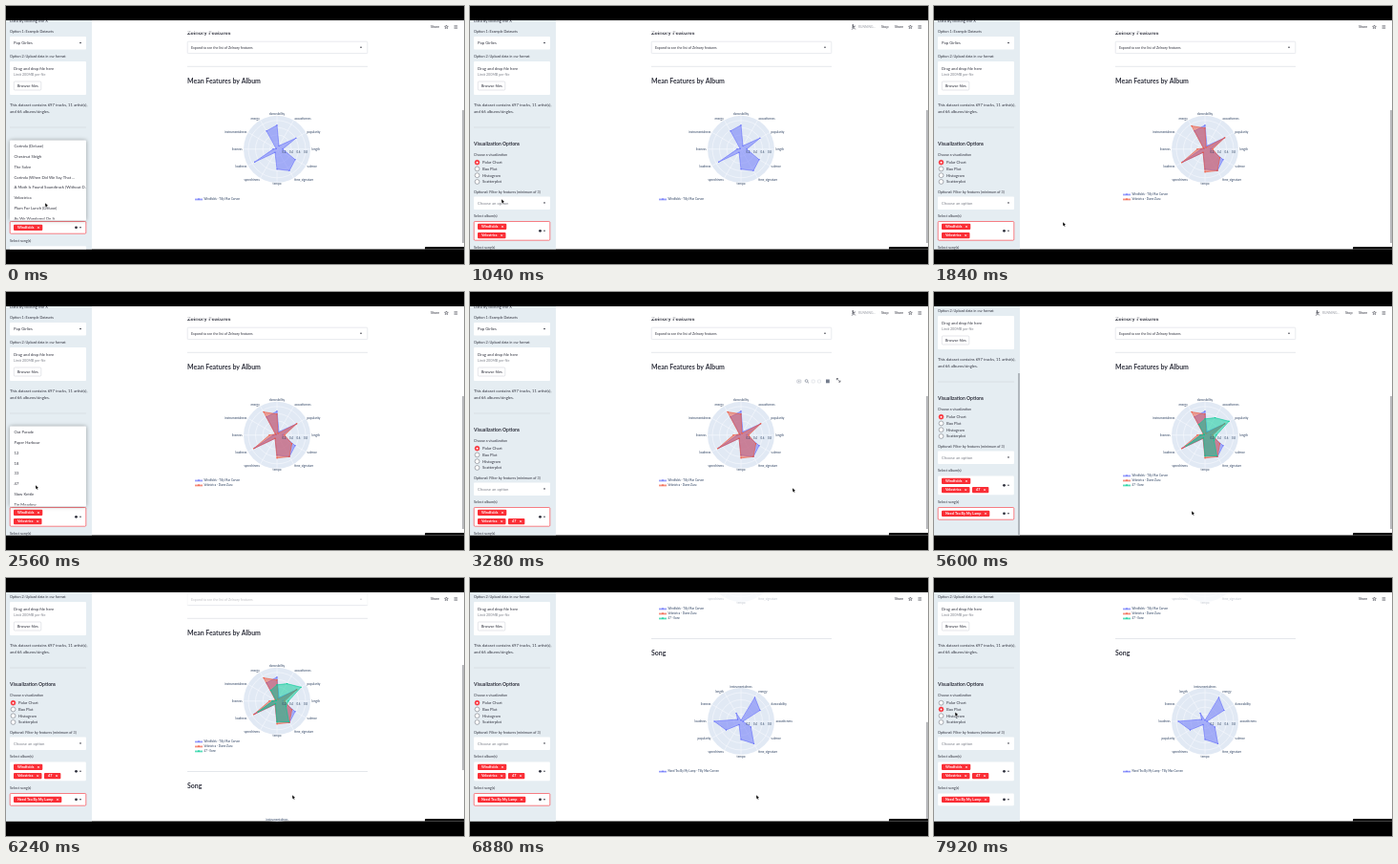
An HTML page with a canvas that plays this animation: 480 by 270 pixels, repeating every 8000 ms.

```html
<!DOCTYPE html>
<html lang="en">
<head>
<meta charset="utf-8">
<title>Music dashboard</title>
<style>
html, body { margin: 0; width: 100%; height: 100%; overflow: hidden; background: #000; }
canvas { display: block; width: 480px; height: 270px; }
</style>
</head>
<body>
<canvas id="stage"></canvas>
<script>
const LOOP = 8000;
const INK = '#31333f', RED = '#fa2d35', SIDE = '#e5edf2', GREY = '#7f838c';
const BLUE = '99,110,250', CORAL = '239,85,59', GREEN = '0,204,150';

const canvas = document.getElementById('stage');
const c = canvas.getContext('2d');
const dpr = window.devicePixelRatio || 1;
canvas.width = 480 * dpr;
canvas.height = 270 * dpr;

const albumAxes = ['length', 'popularity', 'acousticness', 'danceability', 'energy', 'instrumentalness',
  'liveness', 'loudness', 'speechiness', 'tempo', 'time_signature', 'valence'];
const songAxes = ['acousticness', 'danceability', 'energy', 'instrumentalness', 'length', 'liveness',
  'loudness', 'popularity', 'speechiness', 'tempo', 'time_signature', 'valence'];
const albums = [
  { tag: 'Windfolds', name: 'Windfolds - Tilly Mae Corven', rgb: BLUE, r: [6, 23, 4, 25, 22, 1, 4, 27, 4, 21, 26, 22] },
  { tag: 'Velostrica', name: 'Velostrica - Dame Zuzu', rgb: CORAL, r: [8, 24, 2, 22, 28, 2, 8, 28, 4, 24, 26, 18] },
  { tag: '47', name: '47 - Ilone', rgb: GREEN, r: [12, 29, 21, 17, 13, 1, 5, 23, 3, 22, 25, 11] }
];
const song = { tag: 'Need Tea By My Lamp', name: 'Need Tea By My Lamp - Tilly Mae Corven', rgb: BLUE,
  r: [2, 23, 29, 1, 10, 4, 28, 18, 4, 19, 27, 12] };
const albumList = ['Corinda (Deluxe)', 'Chestnut Sleigh', 'The Salve', "Corinda (When Did We Say That ...",
  'A Moth Is Found Soundtrack (Without D...', 'Velostrica', 'Plum For Lunch (Deluxe)', 'As We Wandered On It',
  'Oat Parade', 'Paper Harbour', '12', '18', '33', '47', 'Slow Kettle', 'Tin Meadow'];
const songList = ['Bright Crumbs', 'Quiet Ladder', 'Need Tea By My Lamp', 'Half A Pebble', 'Now We Fold It',
  'Soft Gravel', 'The Long Saucer', 'Feathers In Tow'];

// Pointer: time, x, y
const pointer = [[0, 42, 208], [500, 38, 204], [940, 32, 203], [1050, 34, 204], [1700, 136, 228], [1860, 136, 228],
  [2120, 60, 236], [2400, 40, 205], [2720, 24, 203], [2840, 26, 204], [3240, 339, 207], [3560, 338, 207],
  [3900, 60, 205], [4360, 34, 231], [4700, 30, 233], [5080, 36, 170], [5180, 38, 172], [5560, 271, 231],
  [5900, 271, 231], [6200, 301, 229], [7060, 301, 229], [7600, 24, 144], [8000, 23, 142]];

const ramp = (t, a, b) => {
  const p = Math.min(1, Math.max(0, (t - a) / (b - a)));
  return p * p * (3 - 2 * p);
};

function pointerAt(t) {
  const i = Math.max(1, pointer.findIndex(k => k[0] > t));
  const [t0, x0, y0] = pointer[i - 1], [t1, x1, y1] = pointer[i];
  const p = ramp(t, t0, t1);
  return [x0 + (x1 - x0) * p, y0 + (y1 - y0) * p];
}

function text(s, x, y, size = 4.2, color = INK, weight = 400, align = 'left') {
  c.font = `${weight} ${size}px Lato, "Open Sans", sans-serif`;
  c.fillStyle = color;
  c.textAlign = align;
  c.textBaseline = 'middle';
  c.fillText(s, x, y + 0.2);
}

function box(x, y, w, h, fill, stroke, r = 1) {
  c.beginPath();
  c.roundRect(x, y, w, h, r);
  if (fill) { c.fillStyle = fill; c.fill(); }
  if (stroke) { c.strokeStyle = stroke; c.lineWidth = 0.6; c.stroke(); }
}

function path(points, color, width = 0.5) {
  c.beginPath();
  points.forEach(p => c.lineTo(...p));
  c.strokeStyle = color;
  c.lineWidth = width;
  c.stroke();
}

function circle(x, y, r, fill, stroke) {
  c.beginPath();
  c.arc(x, y, r, 0, 7);
  if (fill) { c.fillStyle = fill; c.fill(); }
  if (stroke) { c.strokeStyle = stroke; c.lineWidth = 0.6; c.stroke(); }
}

function clipped(x, y, w, h, draw) {
  c.save();
  c.beginPath();
  c.rect(x, y, w, h);
  c.clip();
  draw();
  c.restore();
}

const rule = (x0, x1, y) => path([[x0, y], [x1, y]], '#c9ced6', 0.5);

function chevron(x, y) {
  c.beginPath();
  c.moveTo(x - 1.2, y - 0.6);
  c.lineTo(x + 1.2, y - 0.6);
  c.lineTo(x, y + 0.9);
  c.fillStyle = INK;
  c.fill();
}

function select(y, label) {
  box(4, y, 80, 13.5, '#fff');
  text(label, 8, y + 6.7, 4.2, label === 'Choose an option' ? GREY : INK);
  chevron(78, y + 6.7);
}

function tag(label, x, y) {
  c.font = '700 3.75px Lato, "Open Sans", sans-serif';
  const w = c.measureText(label).width + 13;
  box(x, y - 3.1, w, 6.3, RED);
  text(label, x + 4, y, 3.75, '#fff', 700);
  const m = x + w - 4.3;
  path([[m - 1, y - 1], [m + 1, y + 1]], '#fff', 0.6);
  path([[m - 1, y + 1], [m + 1, y - 1]], '#fff', 0.6);
  return x + w + 2.5;
}

function multi(y, h, tags, focus) {
  box(4.2, y, 79.6, h, '#fff', focus ? RED : null);
  if (h < 15) tags.forEach(s => tag(s, 8, y + h / 2));
  else {
    tag(tags[0], 8, y + 5.4);
    let x = 8;
    tags.slice(1).forEach(s => { x = tag(s, x, y + 14.6); });
  }
  circle(73.5, y + h / 2, 1.4, INK);
  chevron(78, y + h / 2);
}

function dropdown(items, offset) {
  c.save();
  c.shadowColor = 'rgba(0,0,0,.35)';
  c.shadowBlur = 4 * dpr;
  box(4, 140.5, 80, 84, '#fff');
  c.restore();
  clipped(4, 141, 80, 82.5, () =>
    items.forEach((s, i) => text(s, 8.5, 147 + i * 10.75 - offset)));
}

function sidebar(t, count, hasSong) {
  const extra = count > 1 ? 7 : 0;
  c.fillStyle = SIDE;
  c.fillRect(0, 15, 90, 240);
  c.save();
  c.translate(0, -33 * ramp(t, 3950, 4350));
  text('Data by clicking the X', 4, 16);
  text('Option 1: Example Datasets', 4, 27, 3.75);
  select(32, 'Pop Girlies');
  text('Option 2: Upload data in csv format', 4, 53, 3.75);
  box(4, 58, 80, 35, '#fff');
  text('Drag and drop file here', 8, 65.8);
  text('Limit 200MB per file', 8, 72, 3.7, GREY);
  box(8.3, 79, 28.5, 9, '#fff', '#d3d6dc');
  text('Browse files', 11.7, 83.5);
  text('This dataset contains 697 tracks, 11 artist(s),', 4, 104);
  text('and 66 albums/singles.', 4, 111);
  rule(4, 84, 127);
  text('Visualization Options', 4, 144, 5.05, INK, 700);
  text('Choose a visualization', 4, 156, 3.6);
  const chosen = t >= 7840 ? 1 : 0;
  ['Polar Chart', 'Box Plot', 'Histogram', 'Scatterplot'].forEach((s, i) => {
    const y = 163.7 + i * 6.75;
    circle(7.5, y, 2.4, i === chosen ? RED : '#fff', i === chosen ? RED : '#777b84');
    if (i === chosen) circle(7.5, y, 1, '#fff');
    text(s, 13, y);
  });
  text('Optional: Filter by features (minimum of 3)', 4, 195, 3.75);
  select(199.5, 'Choose an option');
  text('Select album(s)', 4, 220, 3.75);
  multi(225.5, 12.7 + extra, albums.slice(0, count).map(a => a.tag), t < 4620);
  text('Select song(s)', 4, 246 + extra, 3.75);
  if (hasSong) multi(251.5 + extra, 12.7, [song.tag], t < 7840);
  else select(251.2 + extra, 'Choose an option');
  c.restore();
  if (t > 3950 && t < 5800) {
    c.fillStyle = '#8d939b';
    c.fillRect(88.4, 118 - 33 * ramp(t, 3950, 4350), 1.2, 170);
  }
  if (t < 940) dropdown(albumList, 0);
  if (t >= 2140 && t < 2720) dropdown(albumList, 86 * ramp(t, 2200, 2550));
  if (t >= 4640 && t < 5100) dropdown(songList, 0);
}

function radar(cy, axes, series) {
  const cx = 284, R = 35;
  const at = (i, r) => {
    const a = i * Math.PI / 6;
    return [cx + r * Math.cos(a), cy - r * Math.sin(a)];
  };
  circle(cx, cy, R, '#e1e9f4');
  for (let r = 7.5; r < R; r += 7.5) circle(cx, cy, r, null, '#f6f9fd');
  axes.forEach((s, i) => {
    path([[cx, cy], at(i, R)], '#f6f9fd', 0.6);
    const [x, y] = at(i, 36.5);
    text(s, x, y, 3.1, '#2a3f5f', 400, i % 6 === 3 ? 'center' : i > 3 && i < 9 ? 'right' : 'left');
  });
  series.forEach(({ rgb, r }) => {
    c.beginPath();
    r.forEach((v, i) => c.lineTo(...at(i, v)));
    c.closePath();
    c.fillStyle = `rgba(${rgb},.5)`;
    c.fill();
    c.strokeStyle = `rgb(${rgb})`;
    c.lineWidth = 0.6;
    c.stroke();
    r.forEach((v, i) => circle(...at(i, v), 0.7, `rgb(${rgb})`));
  });
  for (let i = 1; i < 5; i++) text((i * 0.2).toFixed(1), cx + i * 7.5, cy + 2.8, 2.8, '#2a3f5f', 400, 'center');
  series.forEach(({ rgb, name }, i) => {
    const y = cy + 52.3 - (series.length - 1 - i) * 5;
    c.fillStyle = `rgba(${rgb},.45)`;
    c.fillRect(198, y, 8, 1.4);
    path([[198, y], [206, y]], `rgb(${rgb})`, 0.7);
    circle(202, y, 0.8, `rgb(${rgb})`);
    text(name, 207.5, y, 2.95, '#2a3f5f');
  });
}

function modebar() {
  const g = '#a9afba';
  box(342.8, 92, 4, 3, null, g, 0.5);
  circle(344.8, 93.5, 0.7, g);
  circle(352.6, 93, 1.4, null, '#6d7686');
  path([[353.6, 94], [355, 95.4]], '#6d7686', 0.7);
  box(358.2, 92, 3, 3, null, '#d5d9e0', 0.3);
  box(364.5, 92, 3, 3, null, '#d5d9e0', 0.3);
  c.fillStyle = '#747d8d';
  c.fillRect(373, 91.5, 3.8, 3.8);
  path([[384.3, 92.2], [384.3, 90.5], [386, 90.5]], INK, 0.6);
  path([[388, 92.5], [388, 94.2], [386.3, 94.2]], INK, 0.6);
  path([[384.5, 90.7], [387.8, 94]], INK, 0.5);
}

function page(t, count, hasChart, scroll, mouse) {
  c.save();
  c.translate(0, -scroll);
  text('Zelnory Features', 190, 28, 6.1, INK, 700);
  box(190.2, 37.2, 188.6, 12.4, '#fff', '#d9dce2');
  text('Expand to see the list of Zelnory features', 194, 43.4, 3.6);
  chevron(372, 43.4);
  rule(190, 379, 63.3);
  text('Mean Features by Album', 190, 79, 6.95, INK, 700);
  radar(149.8, albumAxes, albums.slice(0, count));
  if (hasChart) {
    rule(190, 379, 223.5);
    text('Song', 190, 239, 6.95, INK, 700);
    radar(310, songAxes, [song]);
  }
  c.restore();
  if (mouse[0] > 190 && mouse[1] < 216 && t < 3700) modebar();
}

function star(x, y, r) {
  c.beginPath();
  for (let i = 0; i < 10; i++) {
    const a = i * Math.PI / 5, q = i % 2 ? r * 0.45 : r;
    c.lineTo(x + q * Math.sin(a), y - q * Math.cos(a));
  }
  c.closePath();
  c.strokeStyle = INK;
  c.lineWidth = 0.5;
  c.stroke();
}

function header(t, running) {
  c.fillStyle = 'rgba(255,255,255,.7)';
  c.fillRect(90, 15, 390, 13);
  if (running) {
    const lean = Math.sin(t / 90) * 0.8;
    circle(402 + lean, 20, 0.8, INK);
    path([[402 + lean, 20.5], [402, 22.5], [400.3, 24.6]], INK, 0.7);
    path([[402, 22.5], [403.8, 24.4]], INK, 0.7);
    path([[400, 21.6 - lean], [404, 21.6 + lean]], INK, 0.6);
    text('RUNNING...', 407, 22, 3.3, '#9a9da5');
    text('Stop', 431, 22, 3.75);
  }
  text('Share', 445, 22, 3.75);
  star(461.5, 22, 2);
  for (let i = -1; i < 2; i++) path([[469.6, 22 + i * 1.3], [473.2, 22 + i * 1.3]], INK, 0.5);
}

function arrow(x, y) {
  c.beginPath();
  [[0, 0], [0, 3.9], [0.9, 3.1], [1.6, 4.5], [2.3, 4.2], [1.7, 2.8], [2.8, 2.7]]
    .forEach(([a, b]) => c.lineTo(x - 0.8 + a, y - 1.8 + b));
  c.closePath();
  c.strokeStyle = '#fff';
  c.lineWidth = 0.6;
  c.stroke();
  c.fillStyle = '#000';
  c.fill();
}

function draw(t) {
  const tags = t < 940 ? 1 : t < 2720 ? 2 : 3;
  const drawn = t < 1640 ? 1 : t < 3520 ? 2 : 3;
  const hasChart = t >= 5760;
  const running = [[1000, 1640], [2780, 3520], [5180, 5760]].some(([a, b]) => t >= a && t < b);
  const scroll = 21 * ramp(t, 6020, 6220) + 139 * ramp(t, 6260, 6860);
  const mouse = pointerAt(t);

  c.setTransform(dpr, 0, 0, dpr, 0, 0);
  c.fillStyle = '#000';
  c.fillRect(0, 0, 480, 270);
  clipped(0, 15, 480, 239.5, () => {
    c.fillStyle = '#fff';
    c.fillRect(0, 15, 480, 240);
    clipped(90, 15, 390, 240, () => {
      page(t, drawn, hasChart, scroll, mouse);
      header(t, running);
      if (t < 6950) {
        c.fillStyle = '#8d8f94';
        if (hasChart) c.fillRect(478.4, 82 + scroll * 0.43, 1.2, 110);
        else c.fillRect(478.4, 109, 1.2, 139);
      }
    });
    sidebar(t, tags, t >= 5100);
    arrow(...mouse);
    box(439, 252, 45, 6, '#000');
  });
}

function tick(now) {
  draw(now % LOOP);
  requestAnimationFrame(tick);
}
requestAnimationFrame(tick);
</script>
</body>
</html>
```
